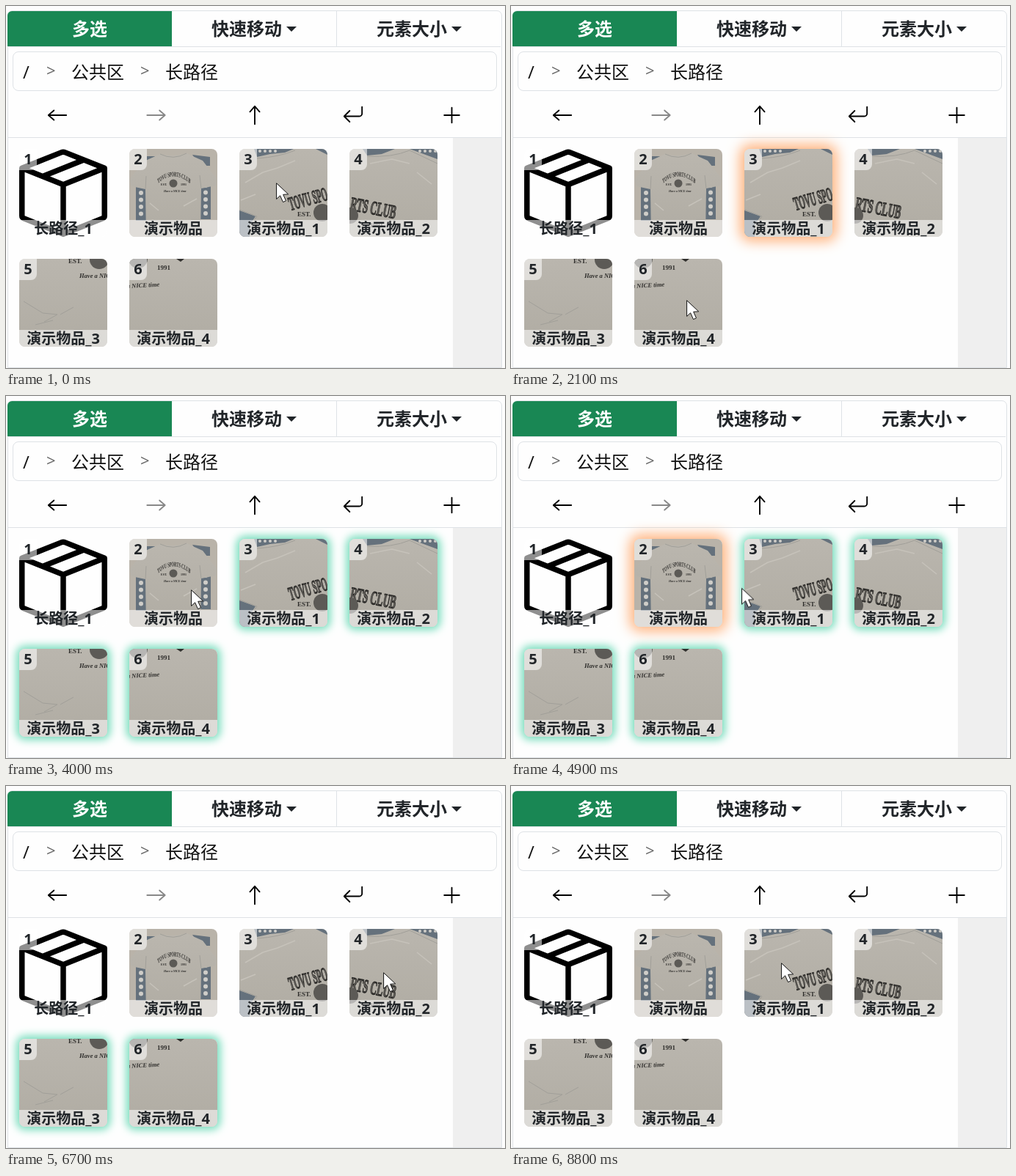
Recreate the animation shown at these times as an HTML page. Size 680 px wide and 494 px high, loop 9000 ms.

```html
<!DOCTYPE html>
<html lang="zh-CN">
<head>
<meta charset="utf-8">
<title>多选</title>
<style>
  html, body { margin: 0; width: 100%; height: 100%; overflow: hidden; background: #fdfdfd; }
  body {
    position: relative; color: #212529;
    font-family: "Open Sans", "Noto Sans CJK SC", "Noto Sans CJK", sans-serif;
  }
  body * { position: absolute; box-sizing: border-box; white-space: nowrap; }
  svg { left: 0; top: 0; overflow: visible; }

  .panel { left: 2px; top: 6px; width: 674px; height: 488px; border: 1px solid #dee2e6; border-radius: 7px 7px 0 0; background: #fefefe; }
  .tab { top: 7px; width: 224px; height: 49px; line-height: 48px; font-size: 24px; font-weight: 700; border-bottom: 1px solid #dee2e6; }
  .tab b { left: 54px; }
  .tab.on { left: 2px; background: #198754; color: #fff; text-align: center; border-radius: 6px 0 0 0; }
  .tab.last { border-left: 1px solid #dee2e6; }
  .caret { left: 156px; top: 21px; border: 7px solid transparent; border-top-color: #212529; border-bottom: 0; }

  .path { left: 9px; top: 62px; width: 660px; height: 54px; border: 1px solid #dee2e6; border-radius: 8px; }
  .path span { top: 0; line-height: 54px; font-size: 24px; color: #111; }
  .path .sep { top: -3px; font-size: 22px; color: #666; }

  .rule { left: 3px; top: 179px; width: 672px; height: 1px; background: #dee2e6; }
  .side { left: 609px; top: 180px; width: 66px; height: 313px; background: #efefef; }
  .icons path { fill: none; stroke: #000; stroke-width: 1; stroke-linecap: round; stroke-linejoin: round; }

  .tile { width: 120px; height: 120px; border-radius: 8px; animation: 9s linear infinite; }
  .tile > svg { width: 120px; height: 120px; overflow: hidden; border-radius: 8px; }
  .num, .name { background: rgba(255,255,255,.56); font-size: 20px; font-weight: 700; text-align: center; }
  .num { left: 0; top: 0; width: 24px; height: 29px; line-height: 28px; border-radius: 8px 0; }
  .name { left: 0; top: 97px; width: 120px; height: 23px; line-height: 23px; border-radius: 0 0 8px 8px; }

  .ink { fill: #2f2e2c; font-family: "Liberation Serif", serif; font-weight: 700; font-size: 9px; }
  .ink circle { fill: #5c5a56; }
  .arch { font-size: 26px; fill: #65625d; stroke: #2b2a28; stroke-width: 1.3; }
  .script { font-style: italic; font-size: 8.5px; }
  .fold { fill: none; stroke: #c6c2ba; stroke-width: 1.5; stroke-linejoin: round; }
  .crease { fill: none; stroke: #a19f99; stroke-width: 1; }
  .slate { fill: #65717c; }
  .holes { fill: none; stroke: #cfcdc8; stroke-linecap: round; }

  :root {
    --off: 0 0 0 0 rgba(255,255,255,0);
    --start: 0 0 18px 6px #ffb27c;
    --picked: 0 0 12px 4px #73dcbb;
  }
  .t2 { animation-name: glow2; }
  .t3 { animation-name: glow3; }
  .t4 { animation-name: glow4; }
  .t5 { animation-name: glow5; }
  .t6 { animation-name: glow6; }
  @keyframes glow2 {
    0%, 46.7% { box-shadow: var(--off); }
    48.9%, 63.9% { box-shadow: var(--start); }
    67.2%, 100% { box-shadow: var(--off); }
  }
  @keyframes glow3 {
    0%, 10% { box-shadow: var(--off); }
    12.2%, 24.4% { box-shadow: var(--start); }
    26.1%, 63.9% { box-shadow: var(--picked); }
    67.2%, 100% { box-shadow: var(--off); }
  }
  @keyframes glow4 {
    0%, 24.4% { box-shadow: var(--off); }
    26.1%, 63.9% { box-shadow: var(--picked); }
    67.2%, 100% { box-shadow: var(--off); }
  }
  @keyframes glow5 {
    0%, 24.4% { box-shadow: var(--off); }
    26.1%, 80% { box-shadow: var(--picked); }
    81.7%, 90% { box-shadow: var(--start); }
    92.2%, 100% { box-shadow: var(--off); }
  }
  @keyframes glow6 {
    0%, 24.4% { box-shadow: var(--off); }
    26.1%, 90% { box-shadow: var(--picked); }
    92.2%, 100% { box-shadow: var(--off); }
  }

  .cursor { left: -1px; top: -1px; width: 20px; height: 30px; animation: roam 9s ease-in-out infinite; }
  @keyframes roam {
    0%, 4.4% { transform: translate(369px, 242px); }
    7.8%, 15% { transform: translate(338px, 269px); }
    19.4%, 28.3% { transform: translate(240px, 402px); }
    31.7%, 38.3% { transform: translate(390px, 418px); }
    43.3%, 52.2% { transform: translate(253px, 265px); }
    58.9%, 75% { transform: translate(515px, 255px); }
    79.4%, 85.6% { transform: translate(96px, 408px); }
    88.9%, 93.3% { transform: translate(230px, 412px); }
    96.1%, 100% { transform: translate(369px, 242px); }
  }
</style>
</head>
<body>
<div class="panel"></div>
<div class="tab on">多选</div>
<div class="tab" style="left:226px"><b>快速移动</b><i class="caret"></i></div>
<div class="tab last" style="left:450px"><b>元素大小</b><i class="caret"></i></div>

<div class="path">
  <span style="left:13px">/</span>
  <span class="sep" style="left:45px">&gt;</span>
  <span style="left:79px">公共区</span>
  <span class="sep" style="left:173px">&gt;</span>
  <span style="left:207px">长路径</span>
</div>

<svg class="icons" width="680" height="180">
  <path transform="translate(55 134) scale(1.875)" d="M14.5 8H1.6M5.5 4.5L1.5 8l4 3.5"/>
  <path transform="translate(189.5 134) scale(1.875)" style="stroke:#888" d="M1.5 8h12.9M10.5 4.5l4 3.5-4 3.5"/>
  <path transform="translate(324 134) scale(1.875)" d="M8 14.5V1.6M4.5 5.5l3.5-4 3.5 4"/>
  <path transform="translate(458 134) scale(1.875)" d="M14.5 2v4.8a2 2 0 0 1-2 2H1.6M5.5 4.8l-4 4 4 4"/>
  <path transform="translate(592.5 134) scale(1.875)" d="M8 2.5v11M2.5 8h11"/>
</svg>
<div class="rule"></div>
<div class="side"></div>

<div class="tile" style="left:18px;top:195px">
  <svg viewBox="0 0 16 16"><path d="M8.186 1.113a.5.5 0 0 0-.372 0L1.846 3.5l2.404.961L10.404 2l-2.218-.887zm3.564 1.426L5.596 5 8 5.961 14.154 3.5l-2.404-.961zm3.25 1.7-6.5 2.6v7.922l6.5-2.6V4.24zM7.5 14.762V6.838L1 4.239v7.923l6.5 2.6zM7.443.184a1.5 1.5 0 0 1 1.114 0l7.129 2.852A.5.5 0 0 1 16 3.5v8.662a1 1 0 0 1-.629.928l-7.185 2.874a.5.5 0 0 1-.372 0L.63 13.09a1 1 0 0 1-.63-.928V3.5a.5.5 0 0 1 .314-.464L7.443.184z"/></svg>
  <div class="num">1</div><div class="name">长路径_1</div>
</div>

<div class="tile t2" style="left:168px;top:195px">
  <svg viewBox="0 0 120 120">
    <defs>
      <linearGradient id="cloth" x2="0" y2="1"><stop stop-color="#bab6ae"/><stop offset="1" stop-color="#b0aca3"/></linearGradient>
      <path id="arc" d="M78 47Q120 28 165 47"/>
    </defs>
    <path fill="#b9b3a9" d="M0 0h120v120H0z"/>
    <path class="slate" d="M9 46h16v52H9zM94 42h17v54H94zM86 8l24 3v12H96zM24 10h14v6H24z"/>
    <path class="holes" stroke-width="6" stroke-dasharray="0 9.5" d="M16 60v34M104 50v44"/>
    <path fill="url(#cloth)" d="M42 7Q60 12 78 6L100 16 120 42 118 50 98 54 97 120H23L22 55 3 51 0 42 20 17z"/>
    <path class="crease" d="M42 7Q60 16 78 6M22 55l1-18M98 54l-2-18"/>
    <path class="fold" d="M28 74l12 10M74 78l18-10"/>
    <g class="ink">
      <text transform="scale(.5 1)" style="font-size:9px"><textPath href="#arc">TOVU SPORTS CLUB</textPath></text>
      <circle cx="60" cy="47" r="5.5"/>
      <text x="43" y="50" style="font-size:4px">EST.</text><text x="70" y="50" style="font-size:4px">1991</text>
      <text class="script" x="47" y="59" style="font-size:4px">Have a NICE time</text>
    </g>
  </svg>
  <div class="num">2</div><div class="name">演示物品</div>
</div>

<div class="tile t3" style="left:318px;top:195px">
  <svg viewBox="0 0 120 120">
    <path fill="url(#cloth)" d="M0 0h120v120H0z"/>
    <path class="slate" d="M20 0h54l-12 5-20 2-18 4zM104 0h16v8zM0 84l22 8-8 12v16H0z"/>
    <path class="holes" stroke-width="4" stroke-dasharray="0 7" d="M28 3h24"/>
    <path class="fold" d="M8 46l24-14 20-6 24-10M2 70l20-8"/>
    <path class="crease" d="M24 13q30-2 52-11M0 83l24 9-8 12"/>
    <g class="ink">
      <text class="arch" transform="translate(70 84) rotate(-16) scale(.41 1)">TOVU SPO</text>
      <circle cx="113" cy="87" r="12"/>
      <text x="79" y="92">EST.</text>
    </g>
  </svg>
  <div class="num">3</div><div class="name">演示物品_1</div>
</div>

<div class="tile t4" style="left:468px;top:195px">
  <svg viewBox="0 0 120 120">
    <path fill="url(#cloth)" d="M0 0h120v120H0z"/>
    <path class="slate" d="M18 0h44l-18 7-20 2zM82 0h38v14z"/>
    <path class="holes" stroke-width="4" stroke-dasharray="0 7" d="M96 3h22"/>
    <path class="fold" d="M28 20l30-6 24 6M92 32l20 16"/>
    <path class="crease" d="M24 10q34 2 58-8l38 18"/>
    <g class="ink">
      <text class="arch" transform="translate(0 83) rotate(11) scale(.49 1)">RTS CLUB</text>
      <circle cx="1" cy="91" r="11"/>
      <text x="28" y="107">1991</text>
    </g>
  </svg>
  <div class="num">4</div><div class="name">演示物品_2</div>
</div>

<div class="tile t5" style="left:18px;top:345px">
  <svg viewBox="0 0 120 120">
    <path fill="url(#cloth)" d="M0 0h120v120H0z"/>
    <path class="crease" d="M6 58l26 16 20 2-18 10M56 76l18-10M22 90l24-6"/>
    <g class="ink">
      <circle cx="109" cy="1" r="13"/>
      <text x="67" y="6">EST.</text>
      <text class="script" x="82" y="26">Have a NICE time</text>
    </g>
  </svg>
  <div class="num">5</div><div class="name">演示物品_3</div>
</div>

<div class="tile t6" style="left:168px;top:345px">
  <svg viewBox="0 0 120 120">
    <path fill="url(#cloth)" d="M0 0h120v120H0z"/>
    <g class="ink">
      <circle cx="12" cy="0" r="13"/>
      <path d="M64 0h11l-5 4z"/>
      <text x="38" y="15">1991</text>
      <text class="script" transform="translate(-3 40) rotate(-3)">a NICE time</text>
    </g>
  </svg>
  <div class="num">6</div><div class="name">演示物品_4</div>
</div>

<svg class="cursor" viewBox="0 0 20 30"><path fill="#fff" stroke="#111" stroke-linejoin="round" d="M.6.8V22.5l5-4.7 3.9 8.8 4-1.8-3.8-8.5 7-.4z"/></svg>
</body>
</html>
```
